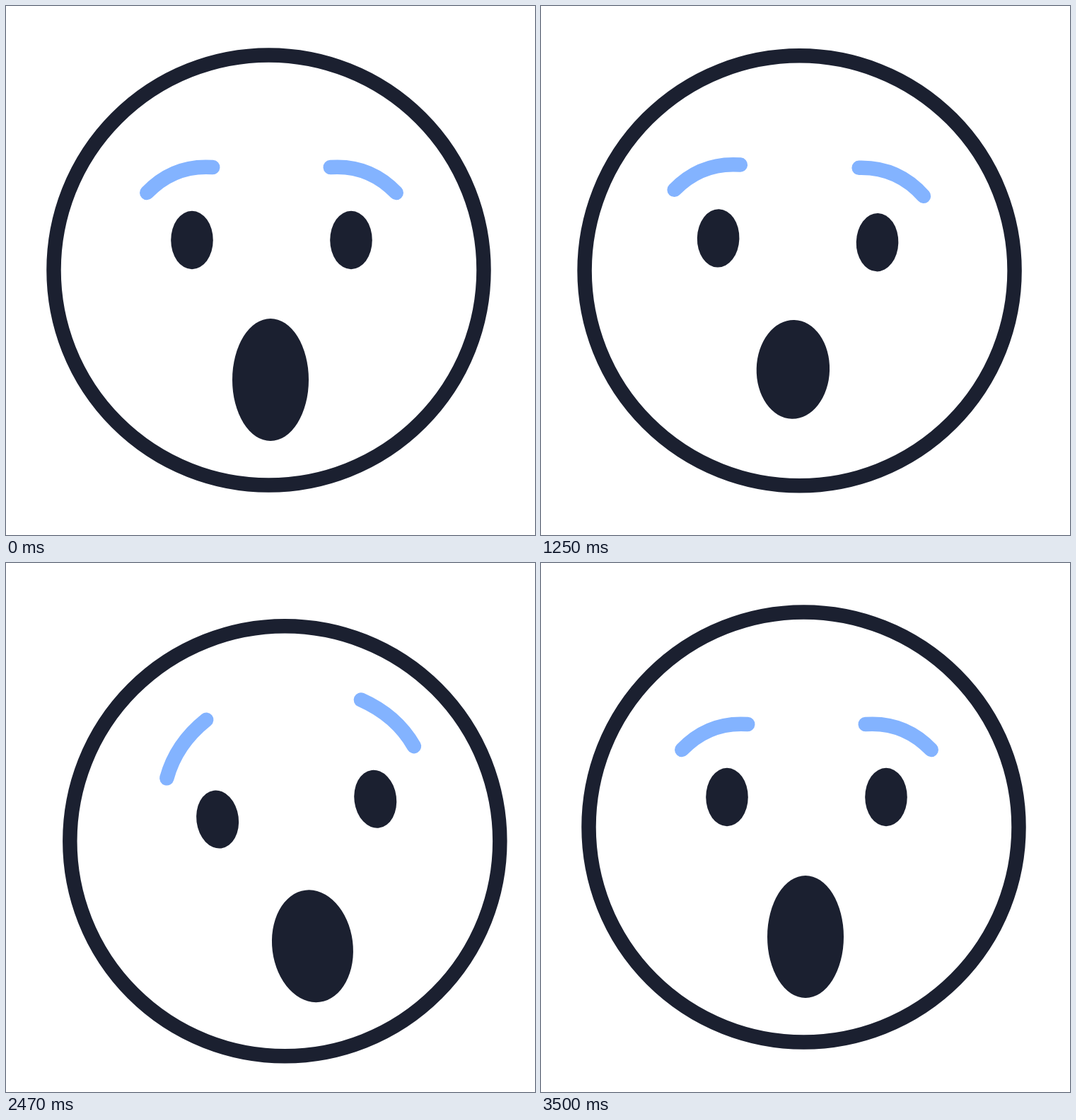
Write an HTML page with a canvas that moves like this. It is 748 px wide and 748 px high and loops after 3520 ms.

```html
<!DOCTYPE html>
<html lang="en">
<head>
<meta charset="utf-8">
<title>Astonished face</title>
<style>
  html, body { margin: 0; width: 100%; height: 100%; overflow: hidden; background: #fff; }
  canvas { display: block; width: 748px; height: 748px; }
</style>
</head>
<body>
<canvas id="stage" width="748" height="748"></canvas>
<script>
const LOOP = 3520, DARK = '#1b2030', BLUE = '#83b3ff', LINE = 20.5;
const ctx = document.getElementById('stage').getContext('2d');

// Key times in ms of the movements that several parts share
const BLINK = [520, 640, 880];
const SWING = [1000, 1710, 2700, 3320];
const MOUTH = [520, 770, 2130, 2830, 3400];

const smooth = u => u * u * u * (10 + u * (6 * u - 15));

// Eases from value to value, resting before the first and after the last
function ease(t, times, values) {
  const i = times.findIndex(time => time > t);
  if (i === 0) return values[0];
  if (i < 0) return values.at(-1);
  const u = (t - times[i - 1]) / (times[i] - times[i - 1]);
  return values[i - 1] + (values[i] - values[i - 1]) * smooth(u);
}

function poseAt(t) {
  const eyeY = ease(t, [1000, 1600, 2080, 2650, 3320], [-42.5, -44, -30, -48.5, -42.5]);
  return {
    x: ease(t, [520, 770, 1020, 1800, 2860, 3240], [371.5, 373, 373, 326, 418.6, 371.5]),
    y: ease(t, [520, 640, 770, 900, 1340, 1840, 2310, 2860, 3220, 3380, 3500],
      [373.5, 418, 348, 348, 376, 364, 399.5, 359, 380, 370, 373.5]),
    squash: ease(t, BLINK, [1, .97, 1]),
    openness: ease(t, BLINK, [1, .1, 1]),
    tilt: ease(t, SWING, [0, 6.1, -8.6, 0]),
    browTurn: ease(t, [1000, 2490, 3190], [0, 27.4, 0]),
    eyeX: ease(t, SWING, [4, -23, 20, 4]),
    eyeY,
    mouthX: ease(t, SWING, [2.5, -46, 47, 2.5]),
    mouthY: eyeY + ease(t, [520, 770, 1300, 3000, 3400], [197.5, 184.5, 182.5, 196, 197.5]),
    mouthRx: ease(t, MOUTH, [54, 46.5, 68, 45, 54]),
    mouthRy: ease(t, MOUTH, [86.5, 57.5, 109, 47.5, 86.5])
  };
}

function ellipse(x, y, rx, ry) {
  ctx.beginPath();
  ctx.ellipse(x, y, rx, ry, 0, 0, 2 * Math.PI);
}

// Keeps the line width free of the current scale
function stroke(color) {
  ctx.save();
  ctx.resetTransform();
  ctx.strokeStyle = color;
  ctx.stroke();
  ctx.restore();
}

function placed(x, y, degrees, paint) {
  ctx.save();
  ctx.translate(x, y);
  ctx.rotate(degrees * Math.PI / 180);
  paint();
  ctx.restore();
}

// A brow turns about its outer end and straightens as it turns
function brow(side, turn, openness) {
  const bend = 16.5 * (1 - turn / 90);
  ctx.save();
  ctx.scale(side, 1);
  placed(176.25, -67, turn, () => {
    ctx.scale(1, openness);
    ctx.beginPath();
    ctx.moveTo(0, 0);
    ctx.bezierCurveTo(-25, -9.7 - bend, -57, -22.1 - bend, -93, -36);
    stroke(BLUE);
  });
  ctx.restore();
}

function draw(t) {
  const pose = poseAt(t);
  ctx.clearRect(0, 0, 748, 748);
  ctx.save();
  ctx.lineWidth = LINE;
  ctx.lineCap = 'round';
  ctx.fillStyle = DARK;

  // The head squashes towards its lowest point
  ctx.translate(pose.x, pose.y + 314);
  ctx.scale(1, pose.squash);
  ctx.translate(0, -314);
  ellipse(0, 0, 304, 304);
  stroke(DARK);

  placed(pose.eyeX, pose.eyeY, pose.tilt, () => {
    for (const side of [-1, 1]) {
      ellipse(side * 112.5, 0, 29.8, 41.2 * pose.openness);
      ctx.fill();
      brow(side, pose.browTurn, pose.openness);
    }
  });
  placed(pose.mouthX, pose.mouthY, pose.tilt, () => {
    ellipse(0, 0, pose.mouthRx, pose.mouthRy);
    ctx.fill();
  });
  ctx.restore();
}

const start = performance.now();
function tick() {
  draw((performance.now() - start) % LOOP);
  requestAnimationFrame(tick);
}
tick();
</script>
</body>
</html>
```
